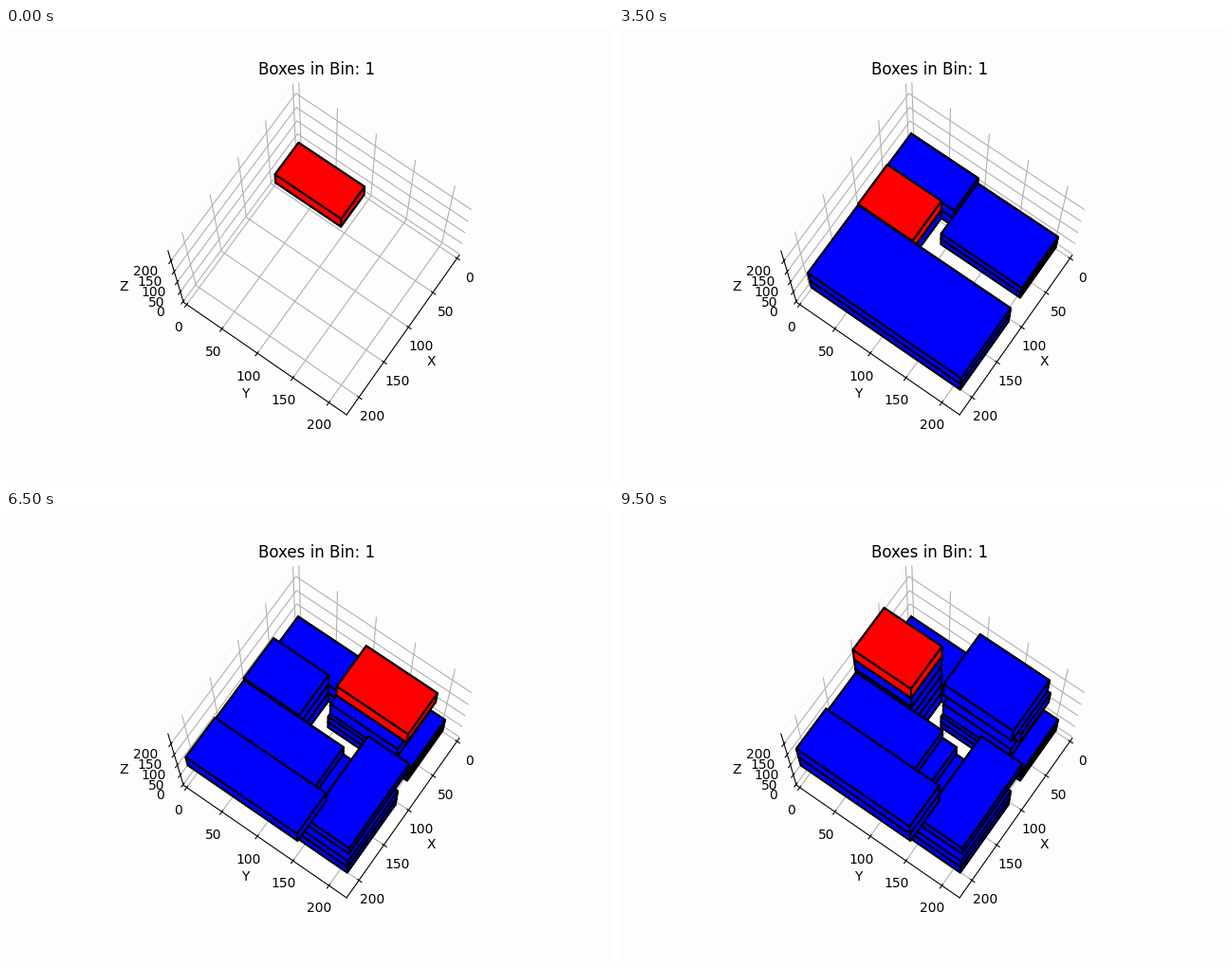
Animation, 640 px wide and 480 px high, one loop 10 s. Source, as a matplotlib script:

```python
import itertools

import matplotlib.pyplot as plt
import numpy as np
from matplotlib.animation import FuncAnimation
from mpl_toolkits.mplot3d.art3d import Poly3DCollection

BACKGROUND = "#fdfdfd"
BIN_SIZE = (220, 220, 240)


def product(dx, dy, dz, x=0, y=0):
    """A box type together with the floor spot it is dropped on."""
    return np.array([x, y, 0]), np.array([dx, dy, dz])


def end_x(box):
    return (box[0] + box[1])[0]


def end_y(box):
    return (box[0] + box[1])[1]


def overlap(a, b):
    """True if two boxes share floor area."""
    return np.all((a[0] < b[0] + b[1])[:2] & (b[0] < a[0] + a[1])[:2])


def drop(box, placed):
    """Lower a box until it rests on whatever lies below its footprint."""
    tops = [(b[0] + b[1])[2] for b in placed if overlap(box, b)]
    return box[0] + [0, 0, max(tops, default=0)], box[1]


def box_faces(corner, size):
    """Return the six quads of an axis-aligned box."""
    loop = [(0, 0), (1, 0), (1, 1), (0, 1)]
    return [
        [corner + size * np.insert(ab, axis, side) for ab in loop]
        for axis, side in itertools.product(range(3), (0, 1))
    ]


def padded(length):
    return -length / 48, length * 49 / 48


# Each type sits beside an earlier one; repeats stack up on the same spot.
brick = product(47, 93, 36)
cube = product(57, 75, 38, x=end_x(brick))
slab = product(97, 209, 36, x=end_x(cube))
tray = product(73, 111, 25, y=end_y(brick))
crate = product(69, 91, 45, y=end_y(brick))
chest = product(57, 95, 39, y=end_y(brick))
plank = product(55, 135, 34, x=end_x(cube))
board = product(55, 116, 32, x=end_x(cube))
beam = product(55, 150, 40, x=end_x(plank))
rail = product(116, 55, 32, x=end_x(tray) + 4.5, y=end_y(beam))

packing = [
    brick, cube, slab, tray, tray, brick, slab, cube, crate, plank,
    beam, rail, cube, chest, board, cube, beam, crate, cube, cube,
]
placed = []
for item in packing:
    placed.append(drop(item, placed))

fig = plt.figure(figsize=(6.4, 4.8), dpi=100, facecolor=BACKGROUND)
ax = fig.add_subplot(projection="3d", facecolor=BACKGROUND)
ax.set_title("Boxes in Bin: 1")
ax.set(xlabel="X", ylabel="Y", zlabel="Z")
ax.set_box_aspect((1, 1, 1))
ax.view_init(elev=75, azim=35)
for axis in (ax.xaxis, ax.yaxis, ax.zaxis):
    axis.set_pane_color(BACKGROUND)

(x0, x1), (y0, _), (_, z1) = map(padded, BIN_SIZE)
ax.plot([x0, x1], [y0, y0], [z1, z1], color="#ededed", lw=0.8, ls=":")

boxes = [
    ax.add_collection3d(Poly3DCollection(
        box_faces(*box), facecolors="blue", edgecolors="black",
        linewidths=1.5))
    for box in placed
]

ticks = range(0, 201, 50)
ax.set(xticks=ticks, yticks=ticks, zticks=ticks)
ax.set(**{f"{name}lim": padded(n) for name, n in zip("xyz", BIN_SIZE)})


def update(step):
    for i, box in enumerate(boxes):
        box.set_visible(i <= step)
        box.set_facecolor("red" if i == step else "blue")
    return boxes


anim = FuncAnimation(fig, update, frames=len(boxes), interval=500,
                     repeat=True, repeat_delay=0)
plt.show()
```
